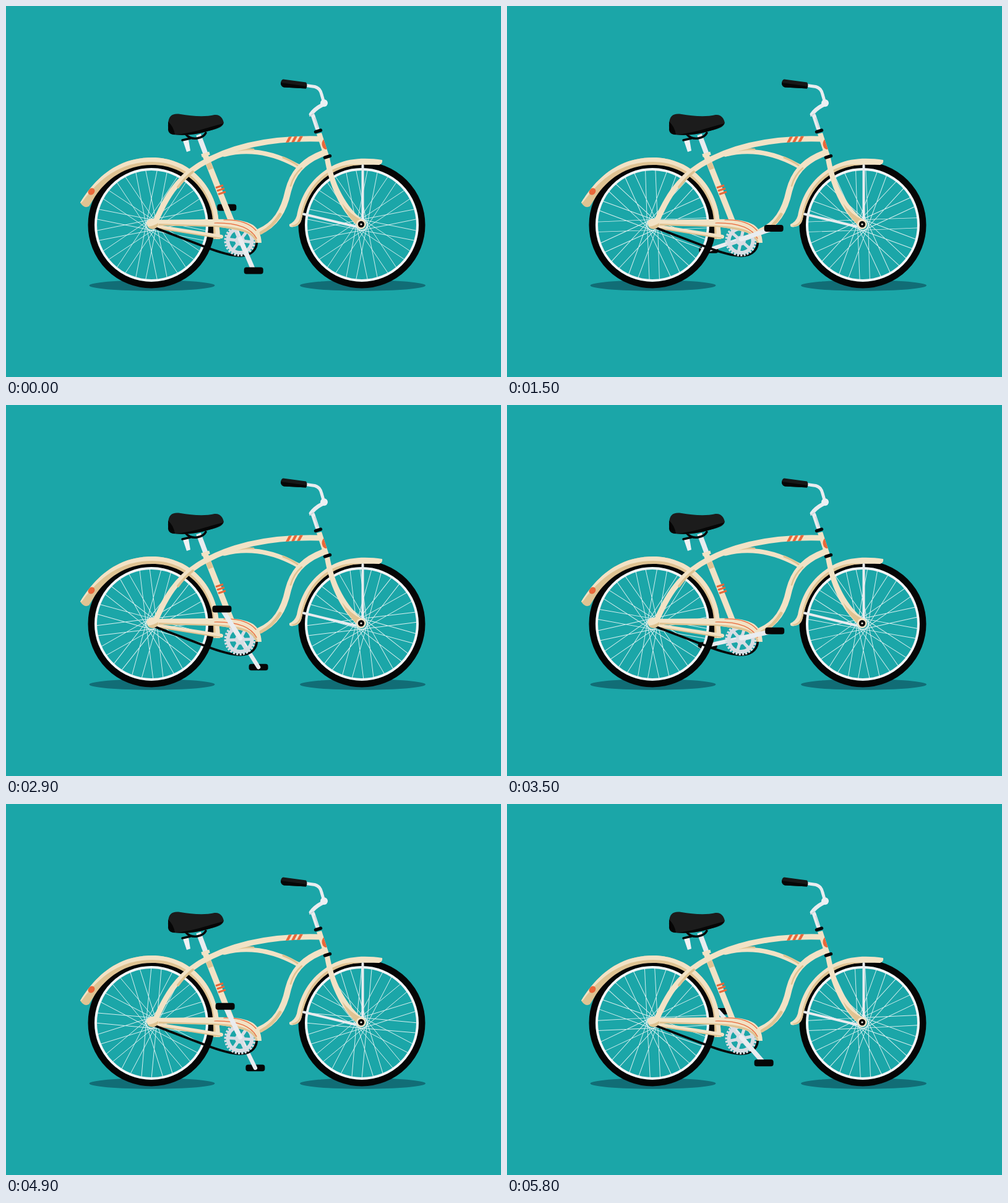
Recreate the animation shown at these times as an HTML page. Size 800x600 px, loop 5900 ms.

```html
<!DOCTYPE html>
<html lang="en">
<head>
<meta charset="utf-8">
<title>Bicycle</title>
<style>
  html, body { margin: 0; width: 100%; height: 100%; overflow: hidden; background: #1ba6a8; }
  svg { display: block; width: 100vw; height: 100vh; }
  .line { fill: none; stroke-linecap: round; stroke-linejoin: round; }
  .butt { stroke-linecap: butt; }
  .cream { stroke: #f2e2c5; }
  .shade { stroke: #dfc392; }
  .white { stroke: #e9ecef; }
  .black { stroke: #060606; }
  .orange { stroke: #e8683a; }
</style>
</head>
<body>
<svg viewBox="0 0 800 600">
  <defs>
    <g id="tyre">
      <circle r="97" fill="none" stroke="#050505" stroke-width="11"/>
      <circle r="90" fill="none" stroke="#f4f6f7" stroke-width="4"/>
    </g>
    <clipPath id="headClip"><path d="M502 207 510 205 522 242 514 244Z"/></clipPath>
    <clipPath id="rearClip">
      <path id="rearGuard" d="M120 318C145 277 181 245 236 245C292 245 330 284 341 330Q345 350 346 377L335 377Q336 352 332 332C321 290 286 257 236 257C192 257 162 281 144 308Q138 318 134 324Q126 328 120 318Z"/>
    </clipPath>
  </defs>

  <g fill="#116d76">
    <ellipse cx="236" cy="452" rx="101.5" ry="8.700"/>
    <ellipse cx="576.500" cy="452" rx="101.5" ry="8.700"/>
  </g>

  <!-- far crank, behind the wheels -->
  <g id="farPedal"><rect x="-15.5" y="-5.3" width="31" height="10.6" rx="4" fill="#060606"/></g>
  <path id="farCrank" class="line white" stroke-width="6.5"/>

  <g transform="translate(235 354)"><g class="spokes"></g><use href="#tyre"/></g>
  <g transform="translate(575 354)"><g class="spokes"></g><use href="#tyre"/></g>

  <!-- mudguards -->
  <use href="#rearGuard" fill="#dfc392"/>
  <g clip-path="url(#rearClip)">
    <path class="line cream" stroke-width="14" d="M118 312C145 275 181 245 236 245C292 245 330 284 341 330Q345 350 346 377"/>
    <ellipse cx="138" cy="300" rx="5" ry="6" fill="#e8683a" transform="rotate(40 138 300)"/>
  </g>
  <path fill="#f2e2c5" d="M608 249C582 245 551 245 525 260C492 279 476 307 470 339Q467 349 458 353Q457 359 465 357Q476 356 478 343C485 307 503 281 533 266C557 255 581 257 603 257Q609 255 608 249Z"/>
  <path fill="#dfc392" d="M575 257C552 254 532 260 516 272C492 290 481 314 476 341Q473 354 461 355Q465 359 472 354Q477 351 479 340C486 306 504 281 533 267C549 260 562 257 575 257Z"/>
  <path class="line white" stroke-width="4" d="M576.500 258V345M481 336.500 564 356.500"/>

  <!-- seat post and saddle -->
  <path class="line white butt" stroke-width="8" d="M311 208 323 240"/>
  <path fill="#f0f2f4" d="M286 218 295 216 298 234 292 236Z"/>
  <path class="line black" stroke-width="3.500" d="M285 217 298 214M290 207Q298 216 309 214Q320 212 323 205"/>
  <path fill="#1c1c1c" d="M262 190C263 177 269 173 282 175C300 178 321 180 337 176C347 175 351 183 352 189C350 197 339 199 324 203C308 208 289 210 270 208Q261 206 262 190Z"/>
  <path fill="#060606" d="M262 187Q271 195 273 208Q261 208 262 197ZM273 208C301 206 323 197 351 190Q348 197 324 203Q301 210 273 208Z"/>

  <!-- frame tubes -->
  <path class="line cream butt" stroke-width="9.500" d="M321 239 365 350"/>
  <path class="line shade butt" stroke-width="8.500" d="M325 249 331 264"/>
  <path class="line cream butt" stroke-width="5" d="M316 242 329 238"/>
  <path class="line orange butt" stroke-width="3.300" d="M339 294 351 290M341 299 353 295M343 304.500 355 300.500"/>

  <path class="line cream" stroke-width="7.500" d="M353 240C392 230 432 236 475 261"/>
  <path class="line shade" stroke-width="3" d="M360 237Q380 231 400 232M448 245Q463 251 473 259"/>
  <path class="line cream" stroke-width="10" d="M513 238C478 251 463 272 456 299C449 332 435 354 409 365"/>
  <path class="line shade" stroke-width="5" d="M443 337Q431 357 412 367"/>
  <path class="line shade" stroke-width="2.500" d="M478 262Q465 273 460 291"/>
  <path class="line cream butt" stroke-width="9" d="M508 215C437 213 369 223 313 257C275 281 258 311 241 350"/>
  <path class="line shade" stroke-width="4" d="M302 268Q289 278 278 293"/>
  <g fill="#e8683a">
    <path d="M452 221 457 211.500 462 211 457 220.500Z"/>
    <path d="M461 220.500 466 211 471 210.500 466 220Z"/>
    <path d="M470 220 475 210.500 480 210.500 475 219.500Z"/>
  </g>

  <!-- handlebar, head and fork -->
  <path class="line white" stroke-width="6.500" d="M503 198 496 177M493 175Q499 166 513 159"/>
  <path class="line white" stroke-width="5" d="M485 128.500 499 130.500Q508 133 510 143L514 157"/>
  <circle cx="514" cy="157" r="6" fill="#edf0f3"/>
  <path class="line" stroke="#d0d6db" stroke-width="1.800" d="M491 178 497 174M499 181 504 196"/>
  <path fill="#171717" d="M448 118.500 485 123.500Q488 128 485 133.500L449 131.500Q444 130 444 124Q445 119 448 118.500Z"/>
  <path fill="#060606" d="M444 124 486 130 485 133.500 449 131.500Q444 130 444 124Z"/>

  <path fill="#f2e2c5" d="M515 247 523 245C530 286 547 322 577 347L571 357C544 338 522 292 515 247Z"/>
  <path fill="#dfc392" d="M543 319Q555 336 576 347L571 357Q552 342 543 319Z"/>
  <path fill="#f2e2c5" d="M502 207 510 205 522 242 514 244Z"/>
  <ellipse cx="517" cy="223" rx="6.500" ry="9" fill="#e8683a" clip-path="url(#headClip)"/>
  <path class="line black" stroke-width="5.500" d="M500.500 203.500 508.500 201M515.500 245 523.500 242.500"/>
  <circle cx="574" cy="353" r="8" fill="#f2e2c5"/>
  <circle cx="574" cy="353" r="5.200" fill="#080808"/>
  <circle cx="574" cy="353" r="1.600" fill="#f0eadb"/>

  <!-- drivetrain -->
  <path class="line cream" stroke-width="6" d="M246 357 348 373"/>
  <path class="line shade" stroke-width="2" d="M250 360 346 375.500"/>
  <path class="line black" stroke-width="3.800" d="M239 358 323 390Q359 404 379 404C397 404 407 393 405 377"/>
  <g id="ring" fill="none" stroke="#d9dde3"></g>
  <path fill="#f2e2c5" d="M242 346 334 345Q382 343 399 354Q412 363 413 383L404 383Q399 369 383 365Q362 359 337 357L244 354Z"/>
  <path fill="#dfc392" d="M247 352 337 355Q383 357 397 368Q405 375 407 383H404Q399 369 383 365Q362 359 337 357L244 355Z"/>
  <path class="line orange" stroke-width="1.200" d="M337 351Q391 350 405 376M352 346Q388 345 404 363"/>
  <ellipse cx="237" cy="352" rx="10" ry="8" fill="#f2e2c5"/>
  <path fill="#dfc392" d="M229 357Q238 356 246 351Q247 358 238 361Q231 361 229 357Z"/>

  <!-- near crank -->
  <path id="nearCrank" class="line white" stroke-width="7.500"/>
  <g id="nearPedal"><rect x="-15.500" y="-5.500" width="31" height="11" rx="4" fill="#060606"/></g>
</svg>
<script>
  const LOOP = 5900, STEP = 100;
  const CRANK = { x: 378.5, y: 377, r: 55.5, start: 67, turns: 3 };
  const WHEEL_TURNS = 6;
  const $ = id => document.getElementById(id);
  const wheels = document.querySelectorAll('.spokes');

  function polar(r, deg) {
    const a = deg * Math.PI / 180;
    return [r * Math.cos(a), r * Math.sin(a)];
  }

  // Crossed pairs running from the hub flange to the rim.
  function spokes() {
    let d = '';
    for (let a = 0; a < 360; a += 22.5)
      for (const side of [-1, 1])
        d += `M${polar(9, a - side * 98)}L${polar(89, a + side * 6)}`;
    return `<path d="${d}" fill="none" stroke="#d9f0f0" stroke-width=".95"/>`;
  }

  function chainring() {
    let arms = '';
    for (let a = 0; a < 360; a += 60) arms += `M0 0L${polar(19, a)}`;
    return `<circle r="19.500" stroke-width="6"/>
      <circle r="23.500" stroke-width="4" pathLength="56" stroke-dasharray="1.200 .8"/>
      <path d="${arms}" stroke-width="5"/>
      <circle r="8" fill="#d9dde3" stroke="none"/>`;
  }

  function setArm(name, angle) {
    const [x, y] = polar(CRANK.r, angle);
    $(name + 'Crank').setAttribute('d', `M${CRANK.x} ${CRANK.y}l${x} ${y}`);
    $(name + 'Pedal').setAttribute('transform', `translate(${CRANK.x + x} ${CRANK.y + y})`);
  }

  function draw(now) {
    const phase = Math.floor(now % LOOP / STEP) * STEP / LOOP;
    const angle = CRANK.start + phase * CRANK.turns * 360;
    setArm('near', angle);
    setArm('far', angle + 180);
    $('ring').setAttribute('transform', `translate(378 379.5) rotate(${angle})`);
    for (const wheel of wheels)
      wheel.setAttribute('transform', `rotate(${phase * WHEEL_TURNS * 360})`);
  }

  for (const wheel of wheels) wheel.innerHTML = spokes();
  $('ring').innerHTML = chainring();

  let begin;
  function tick(now) {
    begin ??= now;
    draw(now - begin);
    requestAnimationFrame(tick);
  }
  draw(0);
  requestAnimationFrame(tick);
</script>
</body>
</html>
```
